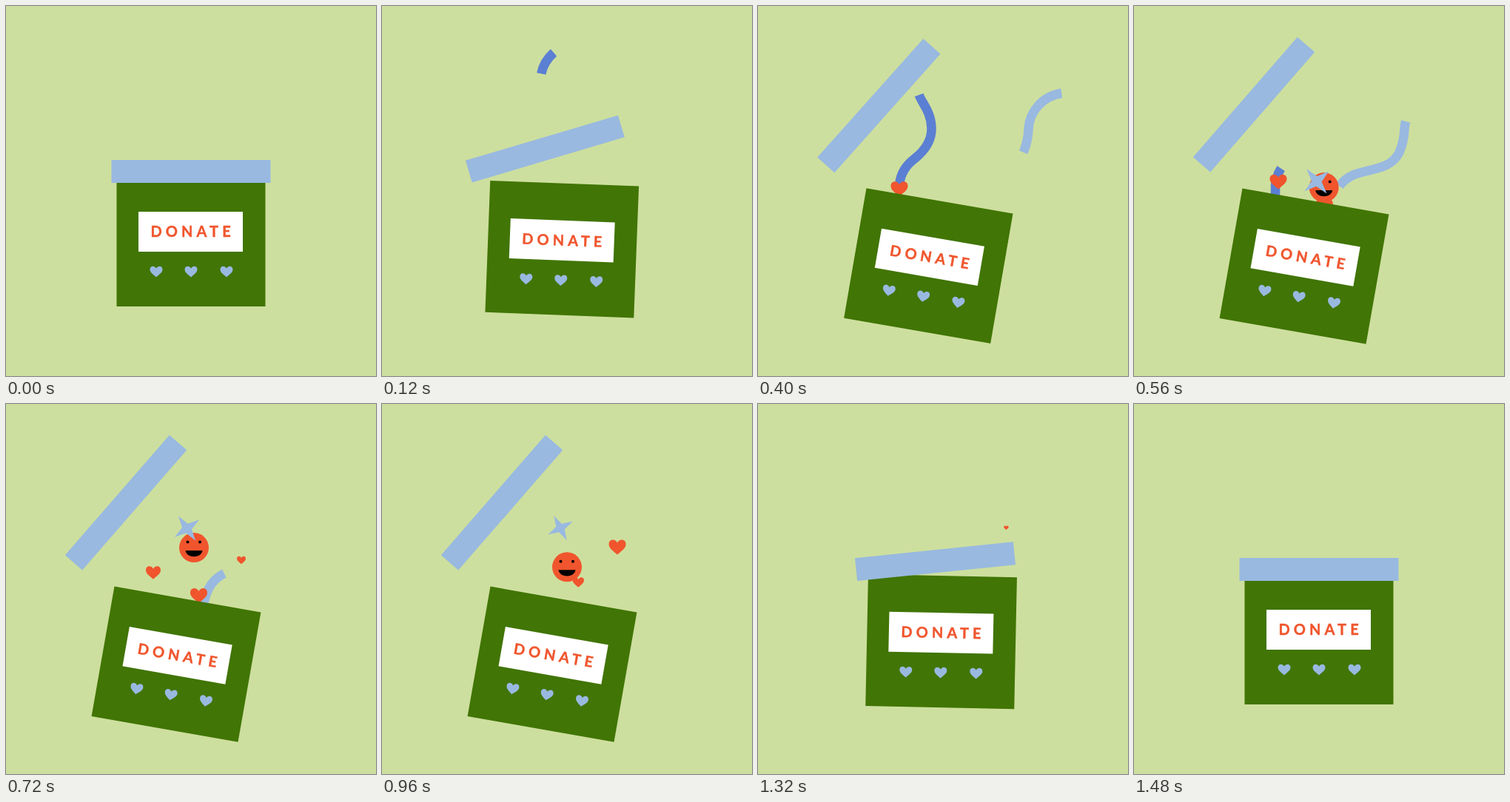
Animation of 500x500 px, one loop 1.96 s. Source, as an HTML page:

```html
<!DOCTYPE html>
<html lang="en">
<head>
<meta charset="utf-8">
<title>Donate</title>
<style>
  html, body { margin: 0; width: 100%; height: 100%; overflow: hidden; background: #cddf9e; }
  svg { display: block; width: 100vw; height: 100vh; }
  text { font: 700 20px Lato, sans-serif; letter-spacing: 5.1px; }
  .ribbon { fill: none; stroke-width: 12.5; }
</style>
</head>
<body>
<svg viewBox="0 0 500 500">
  <defs>
    <path id="heart" d="M0 10C-7 4-11.5 1-11.5-4C-11.5-11-3-12 0-6C3-12 11.5-11 11.5-4C11.5 1 7 4 0 10Z"/>
  </defs>
  <rect width="500" height="500" fill="#cddf9e"/>
  <path id="dark" class="ribbon" stroke="#5b7fd3"
    d="M232 63C213 80 211 102 218 121C222 132 234 143 234.5 165C235 185 222 198 212 206C200 215 190 227 191 250V300"/>
  <path id="light" class="ribbon" stroke="#99b9e0"
    d="M412 117.5C385 121 367 142 365.5 166C365 180 363 188 358 199C345 222 320 219 297 228C275 238 268 255 264 290"/>
  <g id="face">
    <circle r="20" fill="#f0552d"/>
    <circle cx="-8.5" cy="-7.5" r="2"/>
    <circle cx="8" cy="-7.5" r="2"/>
    <path d="M-11.5 4H11.5C10 15-10 15-11.5 4Z"/>
  </g>
  <path id="star" fill="#99b9e0" d="M20 0L4.5 4.5L0 20L-4.5 4.5L-20 0L-4.5-4.5L0-20L4.5-4.5Z"/>
  <g id="hearts" fill="#f0552d">
    <use href="#heart"/><use href="#heart"/><use href="#heart"/>
  </g>
  <g id="box">
    <rect x="-100.5" y="-89" width="201" height="178" fill="#417505"/>
    <rect x="-71" y="-39" width="141" height="54" fill="#fff"/>
    <text x="-54.6" y="-5" fill="#f0552d" stroke="#f0552d" stroke-width=".4">DONATE</text>
    <g fill="#99b9e0">
      <use href="#heart" transform="translate(-47 42)scale(.74)"/>
      <use href="#heart" transform="translate(0 42)scale(.74)"/>
      <use href="#heart" transform="translate(48 42)scale(.74)"/>
    </g>
  </g>
  <rect id="lid" x="-107.5" y="-15.5" width="215" height="31" fill="#99b9e0"/>
</svg>
<script>
const LOOP = 1960, STEP = 40, CLOSED = 1480;
const $ = id => document.getElementById(id);
const clamp = v => Math.min(1, Math.max(0, v));
const span = (t, from, to) => clamp((t - from) / (to - from));

// cubic-bezier(.17, 0, .48, 1), solved by bisection
function ease(x) {
  if (x <= 0 || x >= 1) return clamp(x);
  let lo = 0, hi = 1, s;
  for (let i = 0; i < 24; i++) {
    s = (lo + hi) / 2;
    const v = 3 * (1 - s) ** 2 * s * .17 + 3 * (1 - s) * s * s * .48 + s ** 3;
    if (v < x) lo = s; else hi = s;
  }
  return s * s * (3 - 2 * s);
}

function place(el, x, y, angle = 0, scale = 1) {
  el.setAttribute('transform', `translate(${x} ${y})rotate(${angle})scale(${scale})`);
}
function show(el, on) {
  el.style.visibility = on ? 'visible' : 'hidden';
}

// position at 720 ms, speed per second, sideways bend, end of life
const hearts = [
  { x: 199, y: 228, vx: 25, vy: -60, bend: 0, end: 929 },
  { x: 260.5, y: 259, vx: 20, vy: -75, bend: 0, end: 1120 },
  { x: 318, y: 211, vx: -19, vy: -73, bend: 80, end: 1388 }
];

function drawHeart(h, el, t) {
  const u = (t - 720) / 1000, birth = h.end - 730;
  const scale = Math.min(span(t, birth, birth + 120), 1 - span(t, h.end - 240, h.end));
  show(el, scale > 0);
  place(el, h.x + h.vx * u + h.bend * u * u, h.y + h.vy * u, 0, scale);
}

function drawRibbon(el, t) {
  const head = Math.max(0, .6 * (t - 224));
  const tail = .0119 * Math.max(0, t - 380) ** 1.65;
  show(el, head > 0 && tail < 300);
  el.style.strokeDasharray = `${Math.max(0, head - tail)} 2000`;
  el.style.strokeDashoffset = -tail;
}

// thrown out of the box and falling back in
const arc = (t, top, peak) => top + .00107 * (t - peak) ** 2;

function draw(t) {
  const shut = ease(span(t, 960, CLOSED));
  const open = ease(span(t, 0, 450)) - shut;
  const tilt = ease(span(t, 40, 450)) - shut;
  place($('lid'), 250 - 88 * open, 223.5 - 90.2 * open, -49 * open);
  place($('box'), 250 - 20 * open, 317 + 34.7 * open, 10 * tilt);

  drawRibbon($('dark'), t + 160);
  drawRibbon($('light'), t);

  const u = (t - 720) / 240, aloft = t > 480 && t < 1180;
  show($('face'), aloft);
  place($('face'), 254 - 4 * u, arc(t, 189, 789));
  show($('star'), aloft);
  place($('star'), 244.5 - 3.5 * u, arc(t, 152.4, 841), -35 + 7 * u, Math.max(.5, 1.02 - .08 * u));

  hearts.forEach((h, i) => drawHeart(h, $('hearts').children[i], t));
}

const start = performance.now();
function tick() {
  const t = (performance.now() - start) % LOOP;
  draw(Math.min(CLOSED, Math.floor(t / STEP) * STEP));
  requestAnimationFrame(tick);
}
tick();
</script>
</body>
</html>
```
